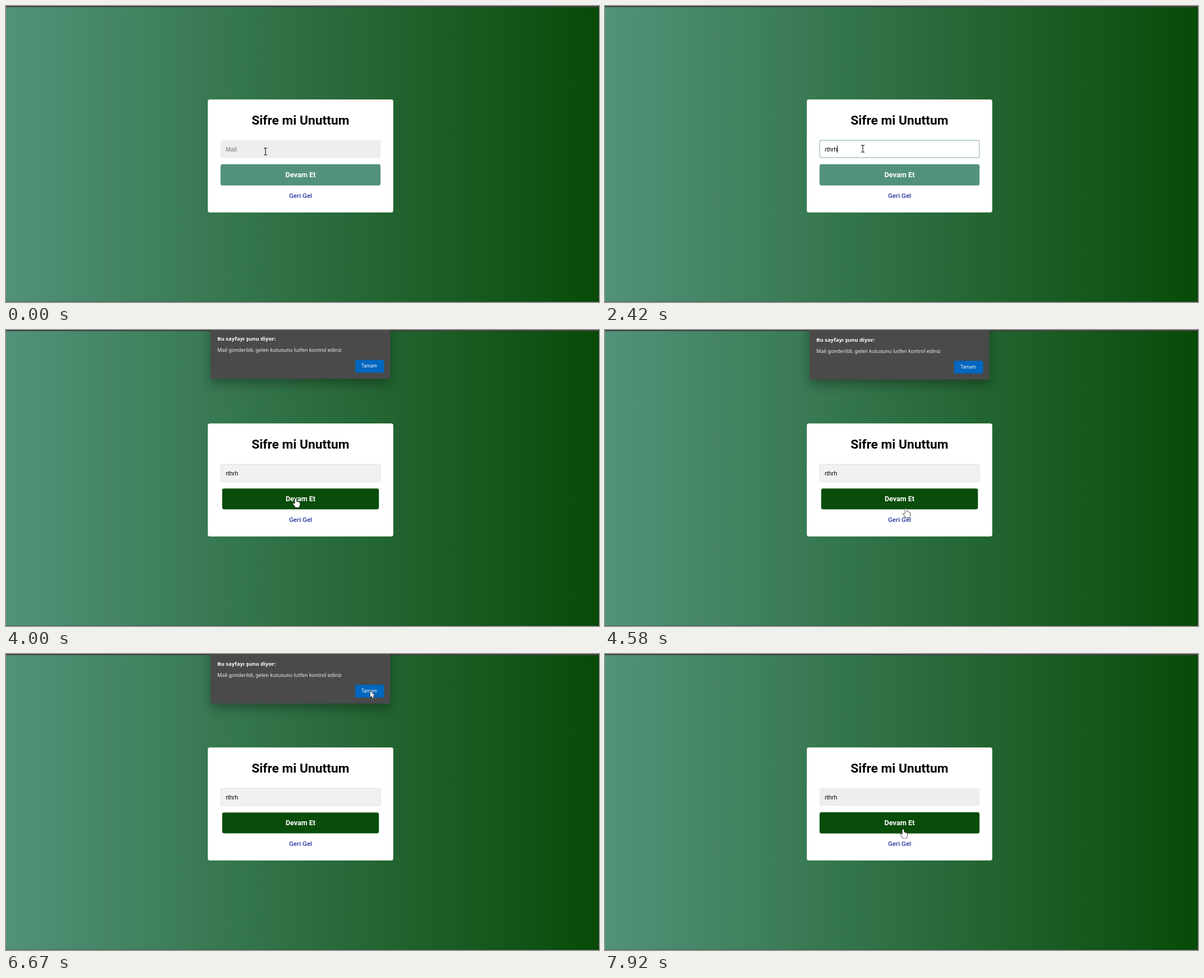
Recreate the animation shown at these times as an HTML page with a canvas. Size 1058 px wide and 529 px high, loop 8 s.

```html
<!DOCTYPE html>
<html lang="tr">
<head>
<meta charset="utf-8">
<title>Sifre mi Unuttum</title>
<style>
  html, body { margin: 0; width: 100%; height: 100%; overflow: hidden; background: #2c7040; }
  canvas { display: block; }
</style>
</head>
<body>
<canvas id="stage" width="1058" height="529"></canvas>
<script>
const W = 1058, H = 529, LOOP = 8000, TICK = 250 / 3;
const ctx = document.getElementById('stage').getContext('2d');

const TEAL = [82, 146, 122], GREEN = [8, 77, 9];
const GREY = [238, 238, 238], WHITE = [255, 255, 255], FOCUS = [132, 169, 155];
const UI = '"Noto Sans", "Open Sans", sans-serif';

// Pointer path: time, x, y
const PATH = [
  [0, 463, 260], [2333, 463, 260], [2417, 460, 255], [2500, 460, 255],
  [2750, 500, 277], [2917, 525, 300], [3167, 540, 311], [3250, 540, 311],
  [3583, 517, 299], [3750, 517, 301], [4250, 517, 301], [4500, 534, 313],
  [4833, 546, 337], [5083, 546, 337], [5167, 532, 336], [5500, 531, 336],
  [5750, 524, 341], [5917, 524, 341], [6250, 575, 235], [6667, 650, 66],
  [6833, 650, 66], [7250, 632, 79], [7583, 565, 262], [7667, 552, 286],
  [7917, 532, 313], [LOOP, 532, 313]
];
const KEYS = [1833, 2000, 2083, 2167, 2250];
const TYPED = 'rthrh';

const clamp = v => Math.min(1, Math.max(0, v));
const ramp = (t, start, span) => clamp((t - start) / span);
const smooth = k => k * k * (3 - 2 * k);
const easeOut = k => 1 - (1 - k) ** 3;
const mix = (a, b, k) => a.map((v, i) => v + (b[i] - v) * k);
const rgb = c => `rgb(${c.map(Math.round).join(',')})`;

function box(x, y, w, h, r, fill) {
  ctx.beginPath();
  ctx.roundRect(x, y, w, h, r);
  ctx.fillStyle = fill;
  ctx.fill();
}

function text(str, x, y, font, color, align = 'left') {
  ctx.font = font;
  ctx.textAlign = align;
  ctx.fillStyle = color;
  ctx.fillText(str, x, y);
}

function pointerAt(t) {
  const i = Math.max(1, PATH.findIndex(p => p[0] >= t));
  const [a, b] = [PATH[i - 1], PATH[i]];
  const k = clamp((t - a[0]) / (b[0] - a[0]));
  return [a[1] + (b[1] - a[1]) * k, a[2] + (b[2] - a[2]) * k];
}

function drawBackground() {
  const g = ctx.createLinearGradient(0, 0, W, 0);
  g.addColorStop(0, rgb(TEAL));
  g.addColorStop(1, rgb([7, 75, 8]));
  ctx.fillStyle = g;
  ctx.fillRect(0, 0, W, H);
  ctx.fillStyle = '#414141';
  ctx.fillRect(0, 0, W, 2);
  ctx.fillStyle = 'rgba(60,60,60,.45)';
  ctx.fillRect(W - 1, 0, 1, H);
  ctx.fillRect(0, H - 1, W, 1);
}

function drawField(t) {
  // The blur transition stays frozen while the alert is open.
  const focus = t < 3700
    ? smooth(ramp(t, 1100, 330))
    : 1 - 0.82 * smooth(ramp(t, 3700, 220)) - 0.18 * ramp(t, 7000, 290);
  box(382.5, 239.5, 286, 32, 4, rgb(mix(GREY, FOCUS, focus)));
  box(383.5, 240.5, 284, 30, 3, rgb(mix(GREY, WHITE, focus)));

  const font = '10.8px "Liberation Sans", Arial, sans-serif';
  const count = KEYS.filter(k => t >= k - 5).length;
  const value = TYPED.slice(0, count);
  if (value) text(value, 392, 259.5, font, '#000');
  else text('Mail', 392, 259.5, font, '#757575');

  const since = t - (count ? KEYS[count - 1] : 1167);
  if (t > 1160 && t < 3740 && since % 1000 < 505) {
    const x = 392 + (value ? ctx.measureText(value).width : 0);
    ctx.fillStyle = '#000';
    ctx.fillRect(Math.round(x), 249.5, 1, 12.5);
  }
}

function drawButton(t) {
  const hover = t < 7000 ? ramp(t, 2780, 280)
    : t < 7600 ? 1 - ramp(t, 7000, 220) : ramp(t, 7600, 290);
  const press = ramp(t, 3690, 80) - ramp(t, 7000, 80);
  const s = 1 - 0.02 * press;
  ctx.save();
  ctx.translate(525.5, 301.8);
  ctx.scale(s, s);
  box(-142.7, -19, 285.4, 38, 3.5, rgb(mix(TEAL, GREEN, smooth(hover))));
  text('Devam Et', 0, 4.4, 'bold 12.8px Roboto, sans-serif', '#fff', 'center');
  ctx.restore();
}

function drawCard(t) {
  box(360, 167, 331, 202, 4, '#fff');
  text('Sifre mi Unuttum', 525.3, 211.5, 'bold 22.8px Roboto, sans-serif', '#000', 'center');
  drawField(t);
  drawButton(t);
  text('Geri Gel', 525.5, 343, '500 11.6px Roboto, sans-serif', '#2b37a0', 'center');
}

function drawAlert(t) {
  if (t < 3745 || t > 7330) return;
  const enter = ramp(t, 3700, 600), leave = ramp(t, 7000, 320);
  ctx.save();
  ctx.globalAlpha = clamp((t - 3700) / 200) * (1 - leave);
  ctx.translate(0, -13 * (1 - easeOut(enter)) - 13 * leave);
  ctx.shadowColor = 'rgba(0,0,0,.32)';
  ctx.shadowBlur = 20;
  ctx.shadowOffsetY = 9;
  box(365, -30, 320.5, 118.5, 2, '#4a4a4a');
  ctx.shadowColor = 'transparent';
  text('Bu sayfayı şunu diyor:', 377, 21, `bold 9.5px ${UI}`, '#fff');
  text('Mail gonderildi, gelen kutusunu lutfen kontrol ediniz', 377, 41, `9px ${UI}`, '#f0f0f0');
  box(623, 55, 51.5, 22.8, 1.5, '#0067c0');
  text('Tamam', 648.2, 69, `500 8px ${UI}`, '#fff', 'center');
  ctx.restore();
}

function outline(d, x, y) {
  const p = new Path2D(d);
  ctx.save();
  ctx.translate(x, y);
  ctx.lineJoin = 'round';
  ctx.lineWidth = 1.3;
  ctx.strokeStyle = '#111';
  ctx.stroke(p);
  ctx.fillStyle = '#fff';
  ctx.fill(p);
  ctx.restore();
}

function drawHand(x, y) {
  outline('M-1.5 1Q0 -.5 1.3 1V6Q3 5 3.8 6.6Q5.3 5.8 6 7.3Q7.3 6.8 7.4 8.5V11.5' +
    'Q7 13 6 14.2V16H-1V14.5L-4.8 10.2Q-5 8.2 -3.3 8.6L-1.5 10Z', x, y);
}

function drawArrow(x, y) {
  outline('M0 0V11.2L2.6 8.8L4.4 12.8L6.3 12L4.6 8.1H8Z', x, y);
}

function drawBeam(x, y) {
  const p = new Path2D('M-3 -6.2H-1L0 -5.4L1 -6.2H3M0 -5.4V5.4M-3 6.2H-1L0 5.4L1 6.2H3');
  ctx.save();
  ctx.translate(x, y);
  ctx.strokeStyle = '#222';
  ctx.lineWidth = 1.2;
  ctx.stroke(p);
  ctx.restore();
}

function drawPointer(t) {
  const [x, y] = pointerAt(t);
  const frozen = t > 3745 && t < 6820;
  const overField = y > 239 && y < 272;
  const overButton = y > 282 && y < 321;
  if (frozen) (y > 89 ? drawHand : drawArrow)(x, y);
  else if (overField) drawBeam(x, y);
  else if (overButton) drawHand(x, y);
  else drawArrow(x, y);
}

function frame(now) {
  const t = Math.floor((now % LOOP + 5) / TICK) * TICK;
  drawBackground();
  drawCard(t);
  drawAlert(t);
  drawPointer(t);
  requestAnimationFrame(frame);
}
requestAnimationFrame(frame);
</script>
</body>
</html>
```
